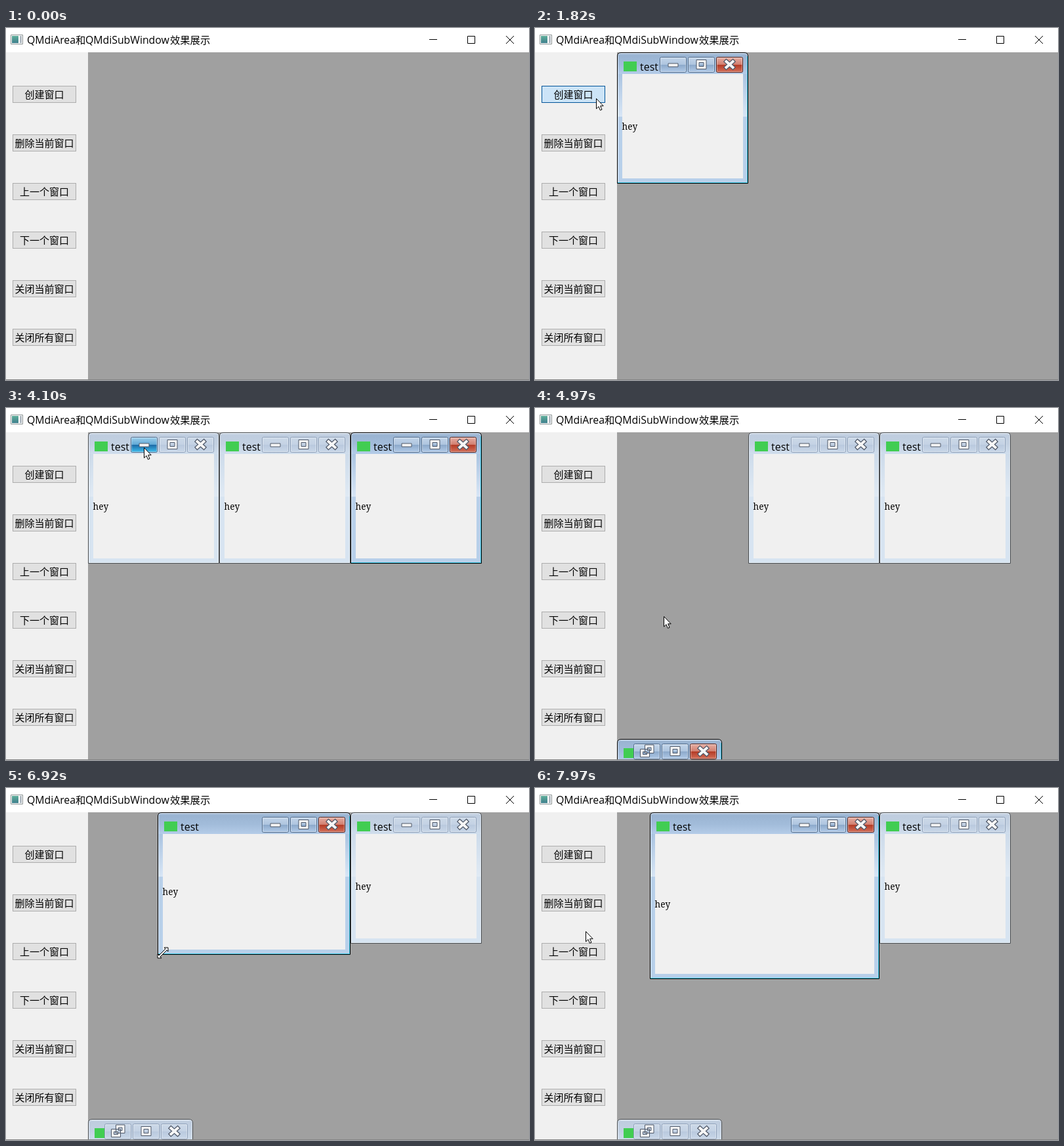
An HTML page that plays this animation: 797x536 px, repeating every 8 s.

```html
<!DOCTYPE html>
<html lang="zh">
<head>
<meta charset="utf-8">
<title>QMdiArea</title>
<style>
html, body { margin: 0; width: 100%; height: 100%; overflow: hidden; background: #a0a0a0; }
svg { display: block; width: 100vw; height: 100vh; }
.cjk { font: 15px "Noto Sans CJK SC", "Noto Sans CJK", sans-serif; }
.ui { font: 16px "Open Sans", "Noto Sans", sans-serif; }
.serif { font: 13.6px "Noto Serif", serif; }
</style>
</head>
<body>
<svg viewBox="0 0 797 536" preserveAspectRatio="none">
  <defs id="defs"><clipPath id="mdi"><path d="M125 37H797V535H125z"/></clipPath></defs>
  <path fill="#fff" d="M0 0H797V37H0z"/>
  <path fill="#f0f0f0" d="M0 37H125V535H0z"/>
  <path fill="#a0a0a0" d="M125 37H797V535H125z"/>
  <path fill="#848484" d="M0 535H797V536H0z"/>

  <path fill="#fff" stroke="#8c9494" d="M7.5 10.5H25.5V24.5H7.5z"/>
  <path fill="url(#icon)" d="M9 12H19V23H9z"/>
  <path fill="#b4bcc4" d="M21 12H24V23H21z"/>
  <g class="ui" style="font-size:15.8px">
    <text x="32" y="24">QMdiArea</text>
    <text x="121" y="24">QMdiSubWindow</text>
  </g>
  <g class="cjk" style="font-size:15.3px">
    <text x="106" y="24">和</text>
    <text x="250" y="24">效果展示</text>
  </g>
  <path fill="none" stroke="#000" d="M645 17.5H657M703.5 12.5H714.5V23.5H703.5zM762 12L774 24M774 12L762 24"/>

  <g id="buttons"></g>
  <g id="windows" clip-path="url(#mdi)"></g>
  <path id="cursor" fill="#fff" stroke="#000"/>
</svg>
<script>
const LOOP = 8000, STEP = 54;
const $ = id => document.getElementById(id);
const clamp = v => Math.min(1, Math.max(0, v));
const ramp = (t, at, length) => clamp((t - at) / length);

const gradients = {
  icon: ['#5fae9a', '#3f7f8c'],
  titleOn: ['#bccfe4', '#9ab4d2 12%', '#a2bcda 55%', '#b4cce8'],
  titleOff: ['#d6e0eb', '#bfcddf 12%', '#c3d1e2 55%', '#d0deed'],
  sideOn: ['#aac4e1', '#d8e6f6'],
  sideOff: ['#cddbea', '#e0eaf4'],
  btnOn: ['#c4d6ea', '#aec5df 48%', '#8ba8ca 50%', '#b2cbe8'],
  btnOff: ['#ccd9e8', '#c4d2e4 48%', '#b9c9de 50%', '#c9d7e8'],
  btnHot: ['#9fd0ec', '#61a9d6 48%', '#1c68a4 50%', '#3fc0f0'],
  btnDown: ['#6fa3c4', '#3f7ca8 48%', '#10466f 50%', '#2a92bd'],
  btnRed: ['#e6b1a6', '#d27f70 48%', '#b33a25 50%', '#d4705a'],
};
$('defs').innerHTML += Object.entries(gradients).map(([id, stops]) =>
  `<linearGradient id="${id}" x2="0" y2="1">` + stops.map((s, i) => {
    const [color, at] = s.split(' ');
    return `<stop offset="${at || (i ? 1 : 0)}" stop-color="${color}"/>`;
  }).join('') + '</linearGradient>').join('');

$('buttons').innerHTML = ['创建窗口', '删除当前窗口', '上一个窗口', '下一个窗口', '关闭当前窗口', '关闭所有窗口']
  .map((label, i) => `<rect x="10.5" y="${88.5 + 74 * i}" width="96" height="25" fill="#e1e1e1" stroke="#adadad"/>
    <text class="cjk" x="58.5" y="${106.5 + 74 * i}" text-anchor="middle">${label}</text>`).join('');
const createButton = $('buttons').querySelector('rect');

// Story: three clicks open windows, the first is minimised, the second resized.
const clicks = [{ down: 1250, up: 1700 }, { down: 2250, up: 2440 }, { down: 2900, up: 3050 }];
const hover = { from: 1140, to: 3440 };
const minimise = { down: 4430, up: 4660 };
const drag = { from: 6690, to: 7570 };
const resizeCursor = { from: 5990, to: 7630 };

const entry = [345, 560];
const moves = [
  { from: 390, to: 1190, end: [93, 107] },
  { from: 3410, to: 4100, via: [324, 86], end: [210, 60] },
  { from: 4970, to: 5440, via: [150, 876], end: [335, 229] },
  { from: 5590, to: 5710, end: [341, 237] },
  { from: 5990, to: 6150, end: [333, 234] },
  { ...drag, via: [220, 240], end: [183, 288] },
  { from: 7890, to: 7970, end: [77, 218] },
];

function cursorAt(t) {
  const i = moves.findLastIndex(m => m.from <= t);
  if (i < 0) return entry;
  const { from, to, via, end } = moves[i], start = i ? moves[i - 1].end : entry;
  const gaps = Math.round((to - from) / STEP);
  const u = clamp((Math.floor((t - from) / (to - from) * gaps) + 1) / (gaps + 1));
  const e = 1 - (1 - u) ** 2;
  return start.map((a, n) => {
    const b = end[n], c = via ? via[n] : (a + b) / 2;
    return Math.round((1 - e) ** 2 * a + 2 * e * (1 - e) * c + e * e * b);
  });
}

// 0 normal, 1 hovered, 2 pressed
function buttonLevel(t) {
  const hovered = ramp(t, hover.from, 50) - ramp(t, hover.to, 90);
  return clicks.reduce((sum, c) => sum + ramp(t, c.down, 50) - ramp(t, c.up + 120, 100), hovered);
}

function mix(colors, level) {
  const i = Math.min(1, Math.floor(level)), u = level - i;
  return `rgb(${colors[i].map((v, n) => Math.round(v + (colors[i + 1][n] - v) * u))})`;
}
const faces = [[225, 225, 225], [229, 241, 251], [204, 228, 247]];
const edges = [[173, 173, 173], [0, 120, 215], [0, 84, 153]];

const glyphs = {
  min: 'M-7.5-1.5h15v5h-15z',
  max: 'M-7.5-7h15v14h-15zM-3.5-3v6h7v-6z',
  restore: 'M-3-9.5H10.5V3H-3zM1-5.5V-1H6.5V-5.5zM-10-3H4V9H-10zM-6 1V5H0V1z',
};

function titleButton(x, y, kind, active, pointer) {
  const hot = pointer.x >= x && pointer.x < x + 41 && pointer.y >= y && pointer.y < y + 24;
  const fill = hot ? (pointer.down ? 'btnDown' : 'btnHot') : !active ? 'btnOff' : kind === 'close' ? 'btnRed' : 'btnOn';
  const edge = fill === 'btnOff' ? '#8d9fb8' : fill === 'btnRed' ? '#562019' : '#4f6a8a';
  const dark = '#4f5868', cross = 'M-5-4.5L5 4.5M5-4.5L-5 4.5';
  const glyph = kind === 'close'
    ? `<path d="${cross}" stroke="${dark}" stroke-width="6.5" stroke-linecap="square"/>
       <path d="${cross}" stroke="#f6f6f6" stroke-width="4" stroke-linecap="square"/>`
    : `<path d="${glyphs[kind]}" fill="#f6f6f6" fill-rule="evenodd" stroke="${dark}" stroke-linejoin="round"/>`;
  return `<rect x="${x + .5}" y="${y + .5}" width="40" height="23" rx="2" fill="url(#${fill})" stroke="${edge}"/>
    <rect x="${x + 1.5}" y="${y + 1.5}" width="38" height="21" rx="1" fill="none" stroke="#fff" stroke-opacity=".4"/>
    <g transform="translate(${x + 20.5} ${y + 11.5})">${glyph}</g>`;
}

function subWindow({ x, y = 37, r = x + 200, b = 237, active, mini }, pointer) {
  const mode = active ? 'On' : 'Off', top = y + 33;
  const outline = (d, foot) => `M${x + d} ${foot - d}V${y + 6}q0 ${d - 6} ${6 - d} ${d - 6}H${r - 6}q${6 - d} 0 ${6 - d} ${6 - d}V${foot - d}z`;
  const body = mini ? '' : `
    <rect x="${x}" y="${top}" width="${r - x}" height="65" fill="url(#side${mode})"/>
    <rect x="${x + 8}" y="${top}" width="${r - x - 16}" height="${b - 8 - top}" fill="#f0f0f0"/>
    <text class="ui" x="${x + 35}" y="${y + 28}">test</text>
    <text class="serif" x="${x + 7.5}" y="${Math.round((top + b - 8) / 2) + 5}">hey</text>`;
  const kinds = [mini ? 'restore' : 'min', 'max', 'close'];
  return `<path d="${outline(.5, b)}" fill="${active ? '#b8d0ea' : '#d7e4f1'}"/>
    <path d="${outline(.5, top + .5)}" fill="url(#title${mode})"/>${body}
    <path d="${outline(1.5, b)}" fill="none" stroke="#fff" stroke-opacity=".45"/>
    ${active ? `<path d="M${x + 1} ${b - 1.5}H${r - 1.5}V${y + 6}" fill="none" stroke="#3ccbe6"/>` : ''}
    <path d="${outline(.5, b)}" fill="none" stroke="${active ? '#000' : '#484c50'}"/>
    <rect x="${x + 10}" y="${y + 14}" width="20" height="15" fill="#41cd52"/>
    ${kinds.map((kind, i) => titleButton(r - 135 + 43 * i, y + 7, kind, active, pointer)).join('')}`;
}

function windowsAt(t) {
  const opened = clicks.filter(c => c.up <= t).length;
  const activeIndex = t >= drag.from ? 1 : t >= minimise.down ? 0 : opened - 1;
  const list = Array.from({ length: opened }, (_, i) => ({ x: 125 + 200 * i, active: i === activeIndex }));
  if (t >= minimise.up) Object.assign(list[0], { y: 504, r: 285, b: 544, mini: true });
  if (t >= drag.from) {
    const [x, y] = cursorAt(Math.min(t, drag.to));
    Object.assign(list[1], { x: x - 8, r: 525, b: y + 3 });
  }
  return list;
}

const arrow = 'M.5.5V16L4 12.6L6.4 18.3L9 17.2L6.6 11.7H11.2z';
const diagonal = 'M8-8H2L4-6L-6 4L-8 2V8H-2L-4 6L6-4L8-2z';
let shown;

function render(now) {
  const t = now % LOOP, level = buttonLevel(t);
  createButton.setAttribute('fill', mix(faces, level));
  createButton.setAttribute('stroke', mix(edges, level));

  const [x, y] = cursorAt(t);
  const pointer = { x, y, down: t >= minimise.down && t < minimise.up };
  const markup = windowsAt(t).map(w => subWindow(w, pointer)).join('');
  if (markup !== shown) $('windows').innerHTML = shown = markup;

  const resizing = t >= resizeCursor.from && t < resizeCursor.to;
  $('cursor').setAttribute('d', resizing ? diagonal : arrow);
  $('cursor').setAttribute('transform', `translate(${x} ${y})`);
}

let start;
function tick(now) {
  start ??= now;
  render(Math.max(0, now - start));
  requestAnimationFrame(tick);
}
render(0);
requestAnimationFrame(tick);
</script>
</body>
</html>
```
